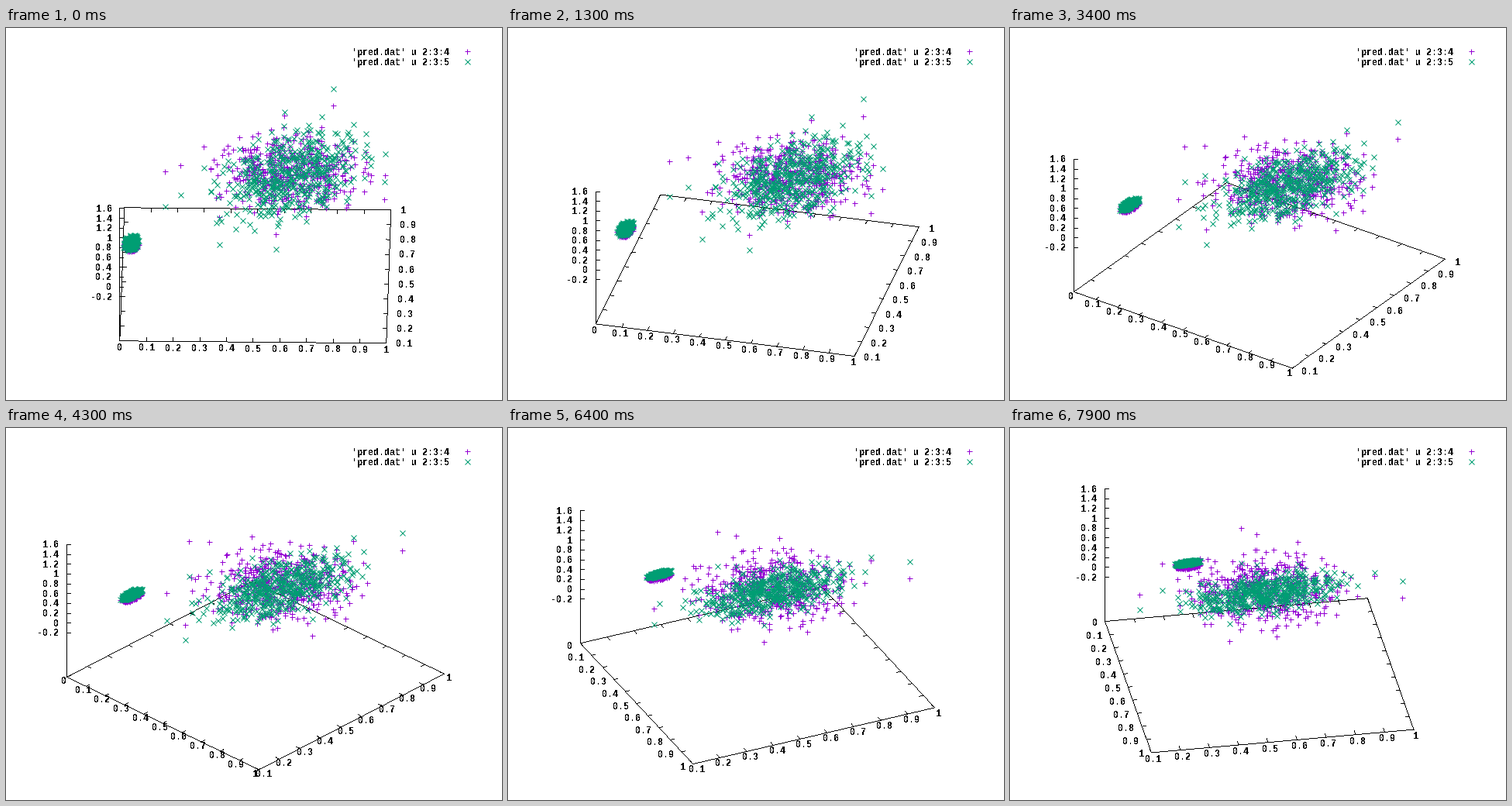
A matplotlib script that plays this animation: 640 by 480 pixels, repeating every 8 s.

```python
import numpy as np
import matplotlib.pyplot as plt
from matplotlib.animation import FuncAnimation
from matplotlib.transforms import Affine2D

W, H, DPI = 640, 480, 100
PX = 72 / DPI
FRAMES, STEP = 80, 100
CX, CY, SIDE = 320.3, 318.8, 344
ZMIN, ZMAX, ZUNIT, ZBASE = -0.2, 1.6, 63.3, 57
TIC = 5
PURPLE, TEAL = '#9400d3', '#009e73'

# Far points that set the extent of the main cloud, in box units
EXTREMES = [(.167, .495), (.225, .544), (.309, .685), (.607, .925),
            (.789, 1), (.992, .304), (.992, .484), (.376, .157), (.591, .034)]


def clipped_normal(rng, n, mean, sigma, reach):
    """Gaussian points kept within `reach` standard deviations."""
    pts = rng.normal(size=(4 * n, 2))
    pts = pts[np.hypot(*pts.T) < reach][:n]
    return np.array(mean) + pts * sigma


rng = np.random.default_rng(11)
blob = clipped_normal(rng, 420, (.041, .312), (.014, .0245), 2.1)
cloud = clipped_normal(rng, 480, (.64, .495), (.135, .145), 2.5)
pts = np.vstack([blob, cloud, EXTREMES])
px, pv = np.clip(pts, 0, 1).T
truth = np.where(np.arange(len(pts)) < len(blob), 0, 1)
fit = -.133 + 1.38 * px + .4 * pv


def height(z):
    return ZBASE + (z - ZMIN) * ZUNIT


def project(x, v, a):
    """Base plane (box units) to stage pixels at turn `a`."""
    dx, dv = x - .5, v - .5
    return (CX + SIDE * (dx * np.cos(a) + dv * np.sin(a)),
            CY + SIDE / 2 * (dx * np.sin(a) - dv * np.cos(a)))


def unit(x, y):
    return np.array([x, y]) / np.hypot(x, y)


plt.rcParams['text.antialiased'] = False
fig = plt.figure(figsize=(W / DPI, H / DPI), dpi=DPI, facecolor='white')
ax = fig.add_axes([0, 0, 1, 1])
ax.set_xlim(-.5, W - .5)
ax.set_ylim(H - .5, -.5)
ax.axis('off')

# Snapped markers land one pixel right and down; move them back
mark_space = Affine2D().translate(-1, -1) + ax.transData


def label(s, x=0, y=0, ha='center'):
    return ax.text(x, y, s, ha=ha, va='baseline', color='black',
                   family='Liberation Mono', weight='bold',
                   size=11.67 * PX, zorder=2)


def marks(shape, color, z):
    return ax.plot([], [], shape, color=color, ms=7 * PX, mew=PX,
                   antialiased=False, transform=mark_space, zorder=z)[0]


ink = ax.plot([], [], ',', color='black', antialiased=False, zorder=1)[0]
plus, cross = marks('+', PURPLE, 3), marks('x', TEAL, 4)

for row, (col, shape, color) in enumerate([(4, '+', PURPLE), (5, 'x', TEAL)]):
    y = 30 + 13 * row
    label(f"'pred.dat' u 2:3:{col}", 571, y + 4.5, 'right')
    marks(shape, color, 4).set_data([595], [y])

x_vals = np.arange(11) / 10
y_vals = np.arange(1, 11) / 10
z_vals = np.arange(-1, 9) / 5
x_labels = [label(f'{t:g}') for t in x_vals]
y_labels = [label(f'{t:g}') for t in y_vals]
z_labels = [label(f'{t:g}', ha='right') for t in z_vals]


def place(text, x, y, ha):
    text.set_position((x, y + 3.5))
    text.set_ha(ha)


def drop(slope):
    return .5 + 8.3 * abs(slope) ** .7


def line(p, q):
    """One-pixel line as a run of whole pixels."""
    p, q = np.array(p), np.array(q)
    n = int(np.ceil(np.abs(q - p).max())) + 1
    return np.round(np.linspace(p, q, n))


def draw_box(a):
    ux = unit(np.cos(a), np.sin(a) / 2)
    uy = unit(np.sin(a), -np.cos(a) / 2)
    corners = [project(x, v, a) for x, v in
               [(0, 0), (1, 0), (1, 1), (0, 1), (0, 0)]]
    left, base = corners[0]
    runs = [line(p, q) for p, q in zip(corners, corners[1:])]
    runs.append(line((left, base), (left, base - height(ZMAX))))

    def tic(p, u):
        runs.append(line(p, p + TIC * np.array(u)))

    for t, text in zip(x_vals, x_labels):
        x, y = project(t, 0, a)
        tic((x, y), uy)
        tic(project(t, 1, a), -uy)
        if uy[0] > .902:
            place(text, x - 8.5, y + drop(uy[1]), 'right')
        else:
            place(text, x + 1.5 - 5 * uy[0], y + drop(uy[1]), 'center')

    for t, text in zip(y_vals, y_labels):
        v = (t - .1) / .9
        x, y = project(1, v, a)
        tic((x, y), -ux)
        tic(project(0, v, a), ux)
        if ux[0] > .902:
            place(text, x + 13.5, y + drop(ux[1]), 'left')
        else:
            place(text, x + 2 + 6 * ux[0], y + drop(ux[1]), 'center')

    for t, text in zip(z_vals, z_labels):
        y = base - height(t)
        tic((left, y), (1, 0))
        place(text, left - 9, y + .5, 'right')

    ink.set_data(*np.vstack(runs).T)


def update(i):
    a = np.radians(i + 1)
    draw_box(a)
    x, y = project(px, pv, a)
    plus.set_data(x, y - height(truth))
    cross.set_data(x, y - height(fit))
    return []


anim = FuncAnimation(fig, update, frames=FRAMES, interval=STEP,
                     repeat=True, repeat_delay=0, blit=False)
plt.show()
```
